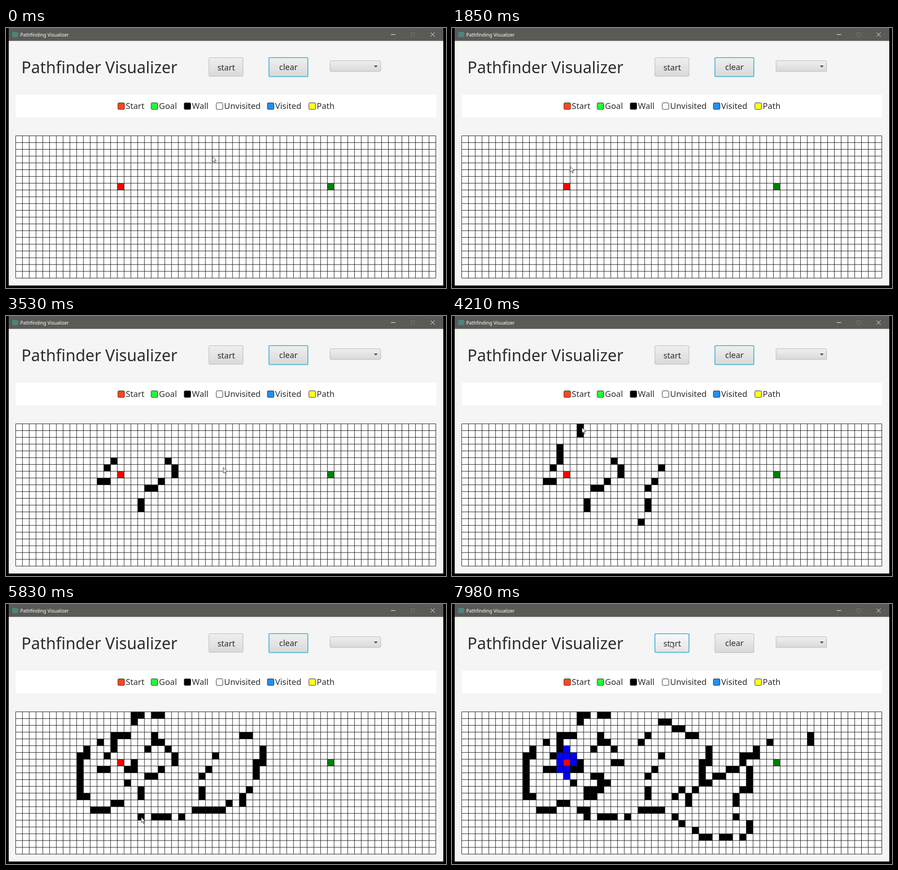
Recreate the animation shown at these times as an HTML page. Size 973 px wide and 575 px high, loop 8000 ms.

```html
<!DOCTYPE html>
<html lang="en">
<head>
<meta charset="utf-8">
<title>Pathfinding Visualizer</title>
<style>
html, body { margin: 0; width: 100%; height: 100%; overflow: hidden; background: #000; }
svg { display: block; width: 973px; height: 575px; }
text { font-family: "Noto Sans", "Open Sans", sans-serif; fill: #2d2d2d; }
.legend { font-size: 18.4px; }
.button text { font-size: 18px; text-anchor: middle; }
.button rect { fill: url(#face); stroke: #b4b4b4; }
.button.hover rect { fill: url(#lit); }
.button.focus rect { stroke: #22a9cf; stroke-width: 1.6; }
</style>
</head>
<body>
<svg viewBox="0 0 973 575">
  <defs>
    <linearGradient id="face" x2="0" y2="1">
      <stop offset="0" stop-color="#efefef"/><stop offset="1" stop-color="#d9d9d9"/>
    </linearGradient>
    <linearGradient id="lit" x2="0" y2="1">
      <stop offset="0" stop-color="#fafafa"/><stop offset="1" stop-color="#e2e2e2"/>
    </linearGradient>
  </defs>
  <rect width="973" height="575"/>
  <rect x="6" width="961" height="569.5" fill="#f5f5f5"/>
  <rect x="6" width="961" height="28.5" fill="#5c5a56"/>
  <rect x="14" y="9" width="13" height="11" fill="#4a8480"/>
  <text x="31.5" y="18.7" font-size="10.5" style="fill:#fff">Pathfinding Visualizer</text>
  <g fill="none" stroke="#fff">
    <path d="M851 14.5h10M939 10l9 9m0-9l-9 9"/>
    <rect x="895.5" y="10.5" width="8" height="8" stroke="#7b7975"/>
  </g>

  <text x="34" y="100" font-size="35.6">Pathfinder Visualizer</text>
  <g class="button" id="start">
    <rect x="448.7" y="65.7" width="75.4" height="41" rx="2"/>
    <text x="487" y="93.5">start</text>
  </g>
  <g class="button" id="clear">
    <rect x="581.5" y="65.5" width="86" height="42" rx="2"/>
    <text x="624.5" y="93">clear</text>
  </g>
  <g class="button">
    <rect x="716.5" y="72.5" width="112" height="23.5" rx="2"/>
    <path d="M813.5 83h8.5l-4.25 4.2z" fill="#444"/>
  </g>

  <rect x="22" y="147" width="929.5" height="50.5" fill="#fff"/>
  <g id="legend"></g>

  <path id="board" fill="#fff"/>
  <path id="walls"/>
  <path id="visited" fill="#00f"/>
  <path id="origin" fill="#f00"/>
  <path id="goal" fill="#008000"/>
  <path id="grid" fill="none" stroke="#111"/>
  <path id="cursor" d="M.5.5V13l2.8-2.5 2 4.6 1.9-.8-2-4.5h3.9z" fill="#fff" stroke="#222" stroke-width=".9"/>
</svg>
<script>
const LOOP = 8000, STEP = 90;
const CELL = 14.985, COLS = 62, ROWS = 21, LEFT = 21.4, TOP = 238.4;
const ORIGIN = [15, 7], GOAL = [46, 7];
const PRESS = 7890, SEARCH = 7980, FOUND = 9;

const el = id => document.getElementById(id);
const setPath = (id, d) => el(id).setAttribute("d", d);
const box = (c, r, w = 1, h = 1) =>
  `M${LEFT + c * CELL} ${TOP + r * CELL}h${w * CELL}v${h * CELL}h${-w * CELL}z`;
const boxes = cells => [...cells].map(key => box(...key.split(",").map(Number))).join("");

// Static parts
let lines = "";
for (let c = 0; c <= COLS; c++) lines += `M${LEFT + c * CELL} ${TOP}v${ROWS * CELL}`;
for (let r = 0; r <= ROWS; r++) lines += `M${LEFT} ${TOP + r * CELL}h${COLS * CELL}`;
setPath("grid", lines);
setPath("board", box(0, 0, COLS, ROWS));
setPath("origin", box(...ORIGIN));
setPath("goal", box(...GOAL));

el("legend").innerHTML = [
  ["Start", 247.5, "#ff4520"], ["Goal", 321, "#22fb36"], ["Wall", 394, "#000"],
  ["Unvisited", 465, "#fff"], ["Visited", 578, "#1e90ff"], ["Path", 669.8, "#ffff20"]
].map(([name, x, color]) =>
  `<rect x="${x}" y="165.5" width="14.5" height="14.5" rx="2" fill="${color}" stroke="#222"/>
   <text class="legend" x="${x + 17.3}" y="179">${name}</text>`).join("");

// A polyline in cell units: its length and the point at a share u of it
function polyline(spec) {
  const pts = spec.split(" ").map(p => p.split(",").map(Number));
  const legs = pts.slice(1).map(([x, y], i) => Math.hypot(x - pts[i][0], y - pts[i][1]));
  const length = legs.reduce((a, b) => a + b, 0);
  const at = u => {
    let rest = u * length, i = 0;
    while (i < legs.length - 1 && rest > legs[i]) rest -= legs[i++];
    if (!legs.length) return pts[0];
    const k = rest / legs[i];
    return pts[i].map((v, axis) => v + (pts[i + 1][axis] - v) * k);
  };
  return { length, at };
}

// Mouse events; a pressed one toggles the cell under it
const events = [];

function hover(from, to, spec) {
  const line = polyline(spec), n = Math.round((to - from) / STEP);
  for (let i = 0; i <= n; i++) {
    const u = n ? i / n : 1;
    events.push({ t: from + i * STEP, at: line.at(u * u * (3 - 2 * u)) });
  }
}

// Strokes sampled about every gap cells, shown in whole steps
function drag(from, to, gap, ...specs) {
  const points = specs.flatMap(spec => {
    const line = polyline(spec), n = Math.round(line.length / gap);
    return Array.from({ length: n + 1 }, (_, i) => line.at(n ? i / n : 0));
  });
  points.forEach((at, i) => {
    const delay = i / (points.length - 1) * (to - from);
    events.push({ t: Math.min(to, from + Math.ceil(delay / STEP) * STEP), at, pressed: true });
  });
}

hover(0, 0, "28.5,2.5");
hover(110, 380, "28,2.6 25.9,3");
hover(660, 1400, "25.9,3 28,2.7 16,6.6 13.5,6.6");
hover(1490, 1850, "13.5,6.6 15.5,4");
drag(1940, 2120, 1.5, "14,5 12,8 13,8");
hover(2210, 2480, "13.8,10.5 17.5,12");
drag(2570, 3190, 1.45, "18,12 19,9.2 23.2,7 22,5");
hover(3280, 3370, "26,5 30.1,5.9");
drag(3590, 3860, 1.7, "29,6.4 27,9 26.8,12 26,14");
hover(3950, 4040, "18,11 13,5.5");
drag(4110, 4280, 1.2, "14,4 14,3", "17,1 17,0 20.9,0");
drag(4450, 4730, 1, "20,4 19,5", "17,7 17,8 16,8", "16,10", "15,13 13,14 11,14");
drag(4820, 5280, 1, "10,12 9,12 9,6 10,6 10,5", "12,4", "15,3 16,3", "20,3 21,4");
hover(5370, 5370, "29.4,1.6");
drag(5460, 5820, 1, "33,3 34,3", "36,5 36,7 35,7 35,9", "34,11 32.8,13",
  "31,13 30,14 27,14", "24,15", "22,15 20,15", "18,15");
drag(5920, 5920, 1, "18,14 17,14", "19,12 19,11 20,11 20,10 21,10", "21,8", "22,7 23,6");
drag(6010, 6370, 1, "26,4 27,3", "29,1 32,2", "42,8 42,11 41,11 40,12 40,13", "40,15");
drag(6460, 6640, 1.4, "42,16 42,17 41,18 35,18 34,17", "32,16 30,14 31,13 31,12 32,11");
drag(6720, 6810, 1.1, "35,10.1 41,7.1", "41,6 43,6 43,5", "45,4 45,3");
drag(6890, 7060, 1, "45,3", "51,3 51,4");
hover(7280, 7820, "51.4,3.8 36,-9.2 30.3,-10.9");

// Breadth-first search: up, right, down, left
function flood(walls, limit) {
  const queue = [ORIGIN], seen = new Set([String(ORIGIN)]);
  while (queue.length) {
    const [c, r] = queue.shift();
    for (const next of [[c, r - 1], [c + 1, r], [c, r + 1], [c - 1, r]]) {
      const key = String(next);
      if (seen.size > limit) return seen;
      if (walls.has(key) || seen.has(key)) continue;
      seen.add(key);
      queue.push(next);
    }
  }
  return seen;
}

function draw(t) {
  const walls = new Set();
  let pointer;
  for (const { t: time, at, pressed } of events) {
    if (time > t) break;
    pointer = at;
    const key = String(at.map(Math.round));
    if (pressed && !walls.delete(key)) walls.add(key);
  }
  setPath("walls", boxes(walls));
  setPath("visited", t >= SEARCH ? boxes(flood(walls, FOUND)) : "");

  const x = LEFT + (pointer[0] + .5) * CELL, y = TOP + (pointer[1] + .5) * CELL;
  el("cursor").setAttribute("transform", `translate(${x} ${y})`.replace(/-0 /, "0 "));
  el("start").classList.toggle("hover", x > 449 && x < 524 && y > 66 && y < 107);
  el("start").classList.toggle("focus", t >= PRESS);
  el("clear").classList.toggle("focus", t < PRESS);
}

const begin = performance.now();
function tick() {
  draw((performance.now() - begin) % LOOP);
  requestAnimationFrame(tick);
}
tick();
</script>
</body>
</html>
```
